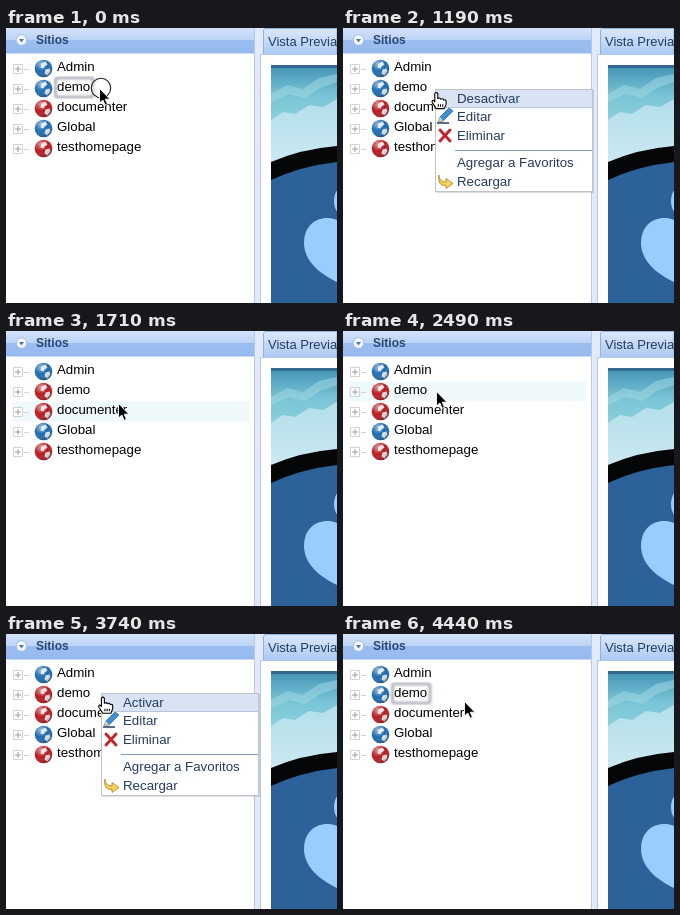
An HTML page that plays this animation: 331x275 px, repeating every 4.92 s.

```html
<!DOCTYPE html>
<html lang="es">
<head>
<meta charset="utf-8">
<title>Sitios</title>
<style>
  html, body { margin: 0; width: 100%; height: 100%; overflow: hidden; background: #fff; }
  svg { display: block; width: 331px; height: 275px; }
  text { font: 13.3px "Liberation Sans", Arial, sans-serif; }
  .head { font-size: 12px; font-weight: bold; fill: #2a4674; }
  .tab { font-size: 13px; fill: #243c5f; }
  #menu text { fill: #243c5f; }
  .red { color: #b81c22; }
  .blue { color: #1f6cb0; }
</style>
</head>
<body>
<svg viewBox="0 0 331 275" xmlns="http://www.w3.org/2000/svg">
  <defs>
    <linearGradient id="bar" x2="0" y2="1">
      <stop offset="0" stop-color="#d3e2fa"/>
      <stop offset=".46" stop-color="#bdd4f6"/>
      <stop offset=".48" stop-color="#9bbef0"/>
      <stop offset="1" stop-color="#96baef"/>
    </linearGradient>
    <linearGradient id="tabFill" x2="0" y2="1">
      <stop offset="0" stop-color="#dbe8fb"/>
      <stop offset="1" stop-color="#adc9f3"/>
    </linearGradient>
    <linearGradient id="sky" x2="0" y2="1">
      <stop offset="0" stop-color="#4191b4"/>
      <stop offset=".5" stop-color="#78c4d6"/>
      <stop offset="1" stop-color="#8fd2df"/>
    </linearGradient>
    <linearGradient id="haze" x2="0" y2="1">
      <stop offset="0" stop-color="#b2dfea"/>
      <stop offset="1" stop-color="#cde9f3"/>
    </linearGradient>
    <radialGradient id="shine" cx=".35" cy=".25" r=".8">
      <stop offset="0" stop-color="#fff" stop-opacity=".55"/>
      <stop offset=".5" stop-color="#fff" stop-opacity="0"/>
      <stop offset="1" stop-color="#000" stop-opacity=".3"/>
    </radialGradient>
    <filter id="soft"><feGaussianBlur stdDeviation=".8"/></filter>
    <clipPath id="photo"><path d="M265 37H331V275H265z"/></clipPath>
    <g id="globe">
      <circle r="8.800" fill="currentColor"/>
      <path d="M-2-5L2-7 4-4 1-2 0 0-3-1zM2 1L6 0 7 3 4 7 1 5z" fill="#eef3f6" opacity=".9"/>
      <circle r="8.800" fill="url(#shine)"/>
    </g>
  </defs>

  <rect width="331" height="275" fill="#fff"/>
  <rect width="249" height="25" fill="url(#bar)"/>
  <path d="M0 25.500H249" stroke="#c9dbf4"/>
  <circle cx="15.500" cy="12" r="5.300" fill="#f3f7fd" stroke="#a5bbdb"/>
  <path d="M13 11h5l-2.500 3.500z" fill="#5577a8"/>
  <text class="head" x="30" y="16">Sitios</text>

  <rect x="248" width="7" height="275" fill="#e2eafa"/>
  <path d="M248.500 0V275M254.500 26V275" stroke="#b3c8ea"/>
  <rect x="255" width="76" height="26" fill="#e2eafa"/>
  <path d="M257.500 26V3Q257.500 .5 260 .5H331V26" fill="url(#tabFill)" stroke="#8fb0de"/>
  <path d="M255 26.500H331" stroke="#b3c9ea"/>
  <text class="tab" x="262" y="18">Vista Previa</text>

  <g clip-path="url(#photo)">
    <rect x="265" y="37" width="66" height="60" fill="url(#sky)"/>
    <path d="M265 37H331V40H265z" fill="#33698c"/>
    <path d="M265 66L281 57 297 61 313 50 331 46V54L314 60 299 70 283 66 265 74z" fill="#a3dce5" opacity=".5"/>
    <path d="M265 92L277 84 289 86 303 77 317 79 331 71V138H265z" fill="url(#haze)"/>
    <path d="M265 134Q295 121 331 118V275H265z" fill="#050608"/>
    <path d="M265 152Q295 138 331 134V275H265z" fill="#2c6199"/>
    <path d="M331 192C316 186 298 194 298 215C298 233 314 246 331 254z" fill="#99ccff"/>
    <ellipse cx="338" cy="173" rx="10" ry="15" fill="#99ccff"/>
  </g>

  <rect id="hover" x="6" width="237" height="20" fill="#eff8fb"/>
  <g id="tree"></g>
  <rect id="focus" x="49.500" y="50" width="37.500" height="19" rx="2" fill="none" stroke="#b4b6bc" stroke-width="3" filter="url(#soft)"/>
  <rect id="ring" x="3" y="28.500" width="242" height="260" rx="2" fill="none" stroke="#b5b5b8" stroke-width="3" filter="url(#soft)"/>

  <g id="menu">
    <rect x="1" y="1" width="158" height="103" fill="#000" opacity=".12"/>
    <rect x=".5" y=".5" width="157" height="102" fill="#fff" stroke="#bfc3ca"/>
    <rect x="1" y="1" width="156" height="18" fill="#d9e3f3"/>
    <path d="M1 18.500H157" stroke="#b4c6e0"/>
    <path d="M20 61.500H157" stroke="#7d9ac4"/>
    <path d="M3 33L5 28 14 19 18 22 8 32z" fill="#3b8fd4" stroke="#245f9c" stroke-width=".7"/>
    <path d="M3 33L5 28 8 32z" fill="#e9cfa1"/>
    <path d="M2 34H14" stroke="#243c5f" stroke-width="1.500"/>
    <path d="M5 41L15 52M15 41L5 52" stroke="#c3272d" stroke-width="3" stroke-linecap="round"/>
    <path d="M4 86Q4 93 11 93V89.500L18 94.500 11 99.500V96.500Q2 97 4 86z" fill="#f8d35c" stroke="#b58a26" stroke-width=".9"/>
    <text id="toggle" x="22" y="14"></text>
    <text x="22" y="32">Editar</text>
    <text x="22" y="51">Eliminar</text>
    <text x="22" y="78">Agregar a Favoritos</text>
    <text x="22" y="97">Recargar</text>
  </g>

  <g id="cursor">
    <circle id="click" cx="1" r="9.700" fill="#fff" fill-opacity=".45" stroke="#222" stroke-width="1.100"/>
    <path id="arrow" transform="translate(-.5 .5)" d="M0 0V14.500L3.300 11.500 5.700 16.800 8 15.800 5.700 10.700H10.400z" fill="#000" stroke="#fff" stroke-width=".9"/>
    <path id="hand" transform="translate(0 2)" d="M-1.500 1.500Q0-.8 1.500 1.500V6.500Q3.500 5 4.500 7 6.500 5.800 7.300 7.800 9.800 7 9.800 9.500V12L8 16.500H0L-4 10.500Q-4.800 8 -2.800 8.300L-1.500 9.800zM2 12V14.500M4.200 12V14.500M6.400 12V14.500" fill="#fff" stroke="#000" stroke-width="1.100" stroke-linejoin="round"/>
  </g>
</svg>
<script>
const LOOP = 4920;
const $ = id => document.getElementById(id);
const show = (id, on) => $(id).setAttribute("visibility", on ? "visible" : "hidden");
const place = (id, x, y) => $(id).setAttribute("transform", `translate(${x} ${y})`);

const sites = [["Admin", "blue"], ["demo", "blue"], ["documenter", "red"], ["Global", "blue"], ["testhomepage", "red"]];
$("tree").innerHTML = sites.map(([name, color], i) => `
  <g transform="translate(0 ${i * 20})">
    <path d="M7.500 36.500h9v9h-9z" fill="#fff" stroke="#d2d2d2"/>
    <path d="M9 41h6M12 38v6" stroke="#a0a0a0"/>
    <path d="M18 41.500h5" stroke="#d4d4d4"/>
    <use href="#globe" x="37.500" y="40.500" class="${color}"/>
    <text x="51" y="43">${name}</text>
  </g>`).join("");
const demoGlobe = document.querySelectorAll("#tree use")[1];

// start, end, number of steps, destination
const moves = [
  [60, 240, 3, 91, 61],
  [1190, 1480, 5, 113, 72],
  [2250, 2490, 5, 94, 60],
  [3740, 3970, 5, 122, 67]
];
const clicks = [[0, 60], [960, 1010], [1660, 1710], [3320, 3380], [4390, 4440]];

function cursorAt(t) {
  let x = 94, y = 60;
  for (const [start, end, steps, toX, toY] of moves) {
    if (t < start) break;
    const k = Math.min(1, (Math.floor((t - start) / (end - start) * (steps - 1)) + 1) / steps);
    const ease = k * k * (3 - 2 * k);
    x += (toX - x) * ease;
    y += (toY - y) * ease;
  }
  return [x, y];
}

function draw(t) {
  const within = (a, b) => t >= a && t < b;
  const [x, y] = cursorAt(t);
  const firstMenu = within(1010, 1710), secondMenu = within(3380, 4440);
  const menu = firstMenu || secondMenu;
  const hand = menu || within(150, 1010);
  const offline = within(1710, 4440);

  place("cursor", x, y);
  show("hand", hand);
  show("arrow", !hand);
  show("click", clicks.some(([a, b]) => within(a, b)));

  show("focus", t < 960 || t >= 4440);
  show("ring", within(960, 1010));
  show("hover", within(1710, 3380));
  $("hover").setAttribute("y", y < 70 ? 50.5 : 70.5);

  show("menu", menu);
  place("menu", secondMenu ? 95 : 92, secondMenu ? 59 : 61);
  $("toggle").textContent = secondMenu ? "Activar" : "Desactivar";
  demoGlobe.setAttribute("class", offline ? "red" : "blue");
}

const began = performance.now();
function tick() {
  draw((performance.now() - began) % LOOP);
  requestAnimationFrame(tick);
}
tick();
</script>
</body>
</html>
```
